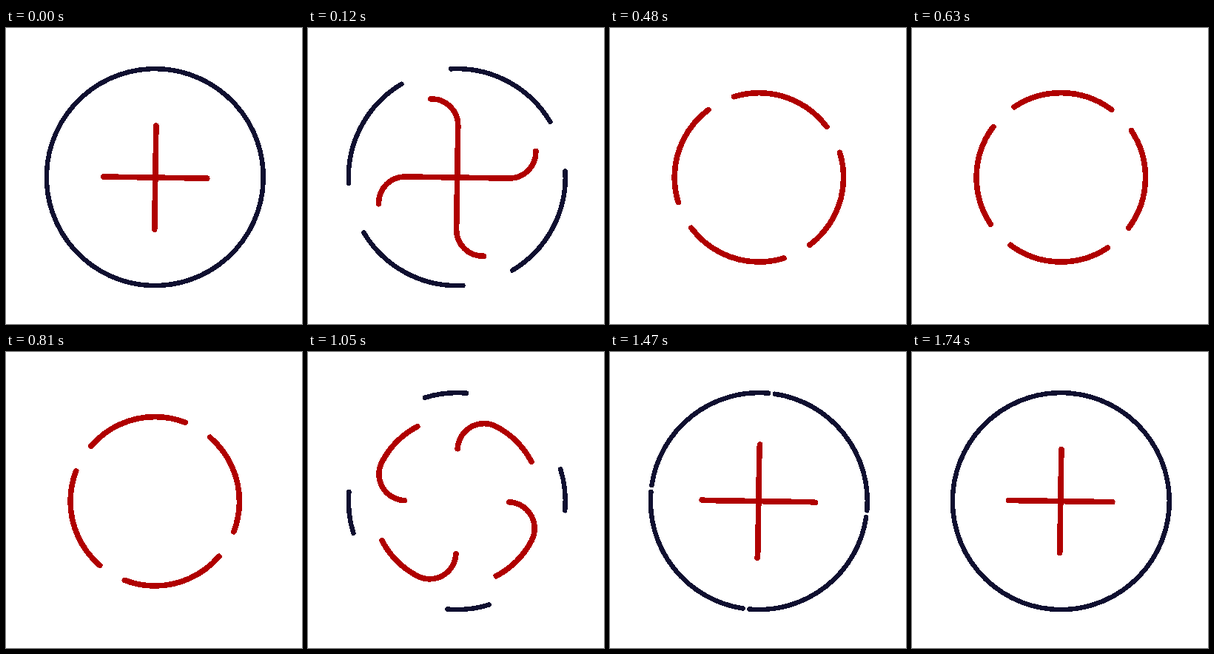
Write an HTML page that moves like this. It is 400 px wide and 400 px high and loops after 3860 ms.

```html
<!DOCTYPE html>
<html lang="en">
<head>
<meta charset="utf-8">
<title>Cross and ring</title>
<style>
  html, body { margin: 0; width: 100%; height: 100%; overflow: hidden; background: #fff; }
  svg { display: block; width: 100vw; height: 100vh; }
  path { fill: none; stroke-linecap: round; shape-rendering: crispEdges; }
  .ring { stroke: #0f0f30; stroke-width: 6.5; }
  .arm { stroke: #b00000; stroke-width: 7.6; }
</style>
</head>
<body>
<svg viewBox="0 0 400 400">
  <g id="ring" transform="translate(201.3 201.6)"></g>
  <g id="cross"></g>
</svg>
<script>
const LOOP = 3860, STEP = 30, MOVE_END = 1740;
const RING = 146.5, ORBIT = 114.2, ARM = 70, TILT = 0.9;
const RING_TRAVEL = 188; // arm travel during which the ring opens or closes

const cross = document.getElementById('cross');

function addPaths(parent, className, tilt) {
  return [0, 90, 180, 270].map(turn => {
    const path = document.createElementNS('http://www.w3.org/2000/svg', 'path');
    path.setAttribute('class', className);
    path.setAttribute('transform', `rotate(${turn + tilt})`);
    parent.append(path);
    return path;
  });
}

const ringParts = addPaths(document.getElementById('ring'), 'ring', 0);
const arms = addPaths(cross, 'arm', TILT);

// Each arm runs out along a bar, joins the orbit by a fillet, and returns to the opposite bar.
const fillet = (ORBIT ** 2 - ARM ** 2) / (2 * ORBIT);
const scale = ORBIT / (ORBIT - fillet);
const joinX = -fillet * scale, joinY = ARM * scale;
const bend = `A${fillet} ${fillet} 0 0 0`;
const track = `M0 ${ARM}V${-ARM}${bend} ${joinX} ${-joinY}` +
  `A${ORBIT} ${ORBIT} 0 0 0 ${joinX} ${joinY}${bend} 0 ${ARM}V${-ARM}`;
arms.forEach(arm => {
  arm.setAttribute('d', track);
  arm.setAttribute('stroke-dasharray', `${2 * ARM} 2000`);
});
const travel = arms[0].getTotalLength() - 2 * ARM;

// Time, distance, speed
const knots = [
  [0, 0, 0.38],
  [240, 124, 0.53],
  [480, 234, 0.33],
  [810, 298, 0.26],
  [1050, travel - 141.6, 0.5],
  [1260, travel - 42.7, 0.33],
  [1440, travel - 10, 0.1],
  [MOVE_END, travel, 0]
];

function distanceAt(time) {
  const i = Math.max(1, knots.findIndex(k => k[0] >= time));
  const [t0, d0, v0] = knots[i - 1], [t1, d1, v1] = knots[i];
  const span = t1 - t0, u = (time - t0) / span, w = 1 - u;
  return d0 * w * w * (1 + 2 * u) + d1 * u * u * (3 - 2 * u) +
    span * u * w * (v0 * w - v1 * u);
}

function ringPoint(degrees) {
  const a = degrees * Math.PI / 180;
  return `${RING * Math.sin(a)} ${-RING * Math.cos(a)}`;
}

function draw(time) {
  const distance = distanceAt(time);
  const leaving = distance < travel / 2;
  const share = 1 - (leaving ? distance : travel - distance) / RING_TRAVEL;
  const from = leaving ? -3.2 : 5 - 90 * share;
  const d = share > 0
    ? `M${ringPoint(from)}A${RING} ${RING} 0 0 1 ${ringPoint(from + 90 * share)}`
    : '';
  ringParts.forEach(part => part.setAttribute('d', d));
  arms.forEach(arm => arm.setAttribute('stroke-dashoffset', -distance));

  // The cross drifts slightly to the upper left as it travels.
  const progress = distance / travel;
  cross.setAttribute('transform',
    `translate(${201.8 - progress} ${202.1 - 0.5 * progress})`);
}

const start = performance.now();
function tick() {
  const time = (performance.now() - start) % LOOP;
  draw(Math.min(Math.floor(time / STEP) * STEP, MOVE_END));
  requestAnimationFrame(tick);
}
tick();
</script>
</body>
</html>
```
